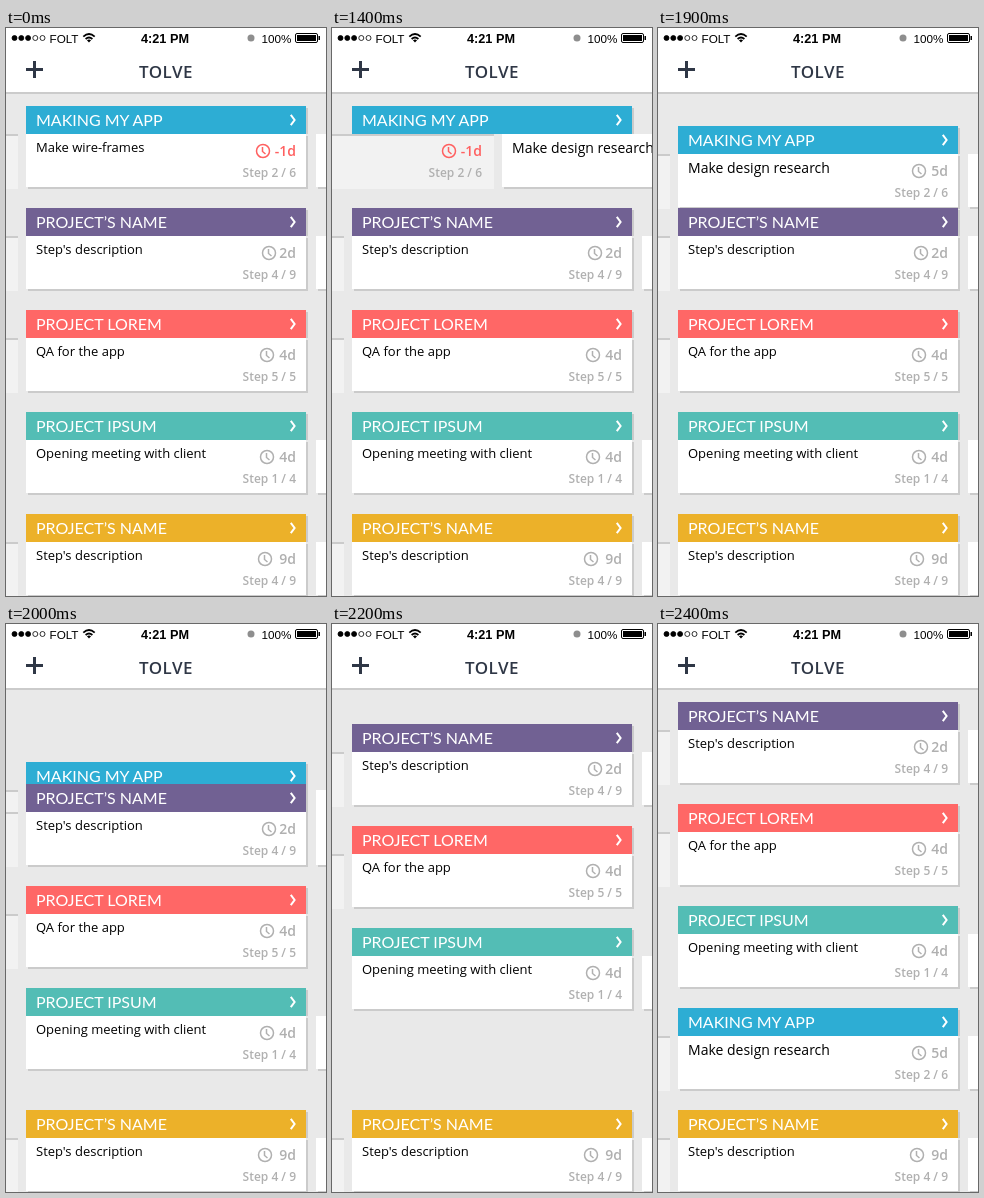
These frames come from a looping animation (320 px wide and 568 px high, 3.5 s). An HTML page:

```html
<!DOCTYPE html>
<html lang="en">
<head>
<meta charset="utf-8">
<title>Project steps</title>
<style>
html, body { margin: 0; width: 100%; height: 100%; overflow: hidden; background: #e9e9e9; }
svg { display: block; width: 320px; height: 568px; }
text { font-family: "Open Sans", sans-serif; white-space: pre; }
.head { font: 400 16px Lato, sans-serif; fill: #fff; }
.due { font-size: 14px; font-weight: 600; text-anchor: end; }
.step { font-size: 12px; font-weight: 600; text-anchor: end; fill: #b0b0b0; }
.title { font-size: 17px; font-weight: 600; letter-spacing: .5px; text-anchor: middle; fill: #2f3746; }
.bar { font: 11.7px "Liberation Sans", Arial, sans-serif; }
.clock { font: bold 12.7px "Liberation Sans", Arial, sans-serif; text-anchor: middle; }
</style>
</head>
<body>
<svg viewBox="0 0 320 568">
  <g id="list"></g>
  <rect width="320" height="64" fill="#fff"/>
  <rect y="64" width="320" height="2" fill="#cbcbcb"/>
  <path d="M20 41.5H37M28.5 33V50" stroke="#2f3746" stroke-width="3"/>
  <text class="title" x="160" y="50">TOLVE</text>
  <g id="dots"></g>
  <text class="bar" x="43.5" y="14.5">FOLT</text>
  <g fill="none" stroke="#000" stroke-width="1.8">
    <path d="M77.3 8.6Q83 3.4 88.7 8.6M79.6 11Q83 8 86.4 11"/>
  </g>
  <path d="M80.9 12.2Q83 10.6 85.1 12.2L83 14.5Z"/>
  <text class="clock" x="159" y="14.5">4:21 PM</text>
  <circle cx="245" cy="10" r="3.5" fill="#8e8e8e"/>
  <text class="bar" x="255.5" y="14.5">100%</text>
  <rect x="289.5" y="5.5" width="22" height="9" rx="1.5" fill="none" stroke="#000"/>
  <rect x="291" y="7" width="19" height="6"/>
  <rect x="312.5" y="8" width="1.5" height="4"/>
</svg>
<script>
const PITCH = 290, GREY = '#b0b0b0', RED = '#ff6060';
const $ = id => document.getElementById(id);
const rect = (x, y, w, h, fill) =>
  `<rect x="${x}" y="${y}" width="${w}" height="${h}" fill="${fill}"/>`;

const openCard = x => rect(x + 2, 30, 280, 53, '#cbcbcb') + rect(x, 28, 280, 53, '#fff');
const doneCard = x => rect(x, 28, 282, 55, '#cbcbcb') + rect(x + 2, 30, 280, 53, '#f2f2f2');

function label(x, [text, due, step, clockX, color = GREY, size = 13]) {
  return `<text x="${x + 10}" y="${size + 33}" font-size="${size}">${text}</text>
    <g transform="translate(${x - 20 + clockX} 45)" fill="none" stroke="${color}" stroke-width="1.5">
      <circle r="6.5"/><path d="M-.5 -4V.5L2.5 3"/></g>
    <text class="due" x="${x + 270}" y="50" fill="${color}">${due}</text>
    <text class="step" x="${x + 270}" y="71">Step ${step}</text>`;
}

function header(name, color) {
  return rect(300, 2, 2, 26, '#cbcbcb') + rect(20, 0, 280, 28, color) +
    `<text class="head" x="30" y="20">${name}</text>
     <path d="M284.8 8.8L288.6 14L284.8 19.2" fill="none" stroke="#fff" stroke-width="2"/>`;
}

// name, color, has left card, has right card, label
const rows = [
  ['MAKING MY APP', '#2dadd4', 1, 1, ['Make wire-frames', '-1d', '2 / 6', 257, RED]],
  ['PROJECT’S NAME', '#716193', 1, 1, ['Step\'s description', '2d', '4 / 9', 263]],
  ['PROJECT LOREM', '#ff6766', 1, 0, ['QA for the app', '4d', '5 / 5', 261]],
  ['PROJECT IPSUM', '#53bdb5', 0, 1, ['Opening meeting with client', '4d', '1 / 4', 261]],
  ['PROJECT’S NAME', '#ecb129', 1, 1, ['Step\'s description', '9d', '4 / 9', 259]]
];
const nextLabel = ['Make design research', '5d', '2 / 6', 261, GREY, 14];

$('list').innerHTML = rows.map(([name, color, left, right, info], i) => {
  let body = left ? doneCard(20 - PITCH) : '';
  if (i) body += openCard(20) + label(20, info);
  else body += `<g id="open">${openCard(20)}</g><g id="done">${doneCard(20)}</g>` + label(20, info);
  if (right) body += openCard(20 + PITCH);
  if (!i) body += label(20 + PITCH, nextLabel) + openCard(20 + 2 * PITCH);
  return `<g id="row${i}"><g id="strip${i}">${body}</g>${header(name, color)}</g>`;
}).join('');

$('dots').innerHTML = [8.5, 15.3, 22.1, 29.3, 36.5].map((x, i) =>
  `<circle cx="${x}" cy="10" r="2.5" fill="${i < 3 ? '#000' : 'none'}" stroke="#000" stroke-width=".8"/>`).join('');

// offsets per 100 ms step; null means tucked out of sight
const slide = [0, 10, 40, 90, 140, 200, 250, 280, 290];
const drop = [0, 20, 60, null, null, 286, 306];
const rise = [0, 0, 20, 50, 80, 100, 102];
const move = (id, x, y) => $(id).setAttribute('transform', `translate(${x} ${y})`);
const show = (id, on) => $(id).setAttribute('visibility', on ? 'visible' : 'hidden');

function draw(now) {
  const k = Math.min(14, Math.floor((now % 3500 - 1000) / 100));
  const v = Math.max(0, k - 8), fall = drop[v];
  show('done', k >= 0);
  show('open', k < 0);
  move('strip0', -slide[Math.max(0, Math.min(8, k))], 0);
  $('row0').setAttribute('display', fall === null ? 'none' : 'inline');
  rows.forEach((_, i) => {
    const dy = i === 0 ? fall || 0 : i < 4 ? -rise[v] : 0;
    move('row' + i, 0, 78 + 102 * i + dy);
  });
}

const start = performance.now();
function tick() {
  draw(performance.now() - start);
  requestAnimationFrame(tick);
}
tick();
</script>
</body>
</html>
```
